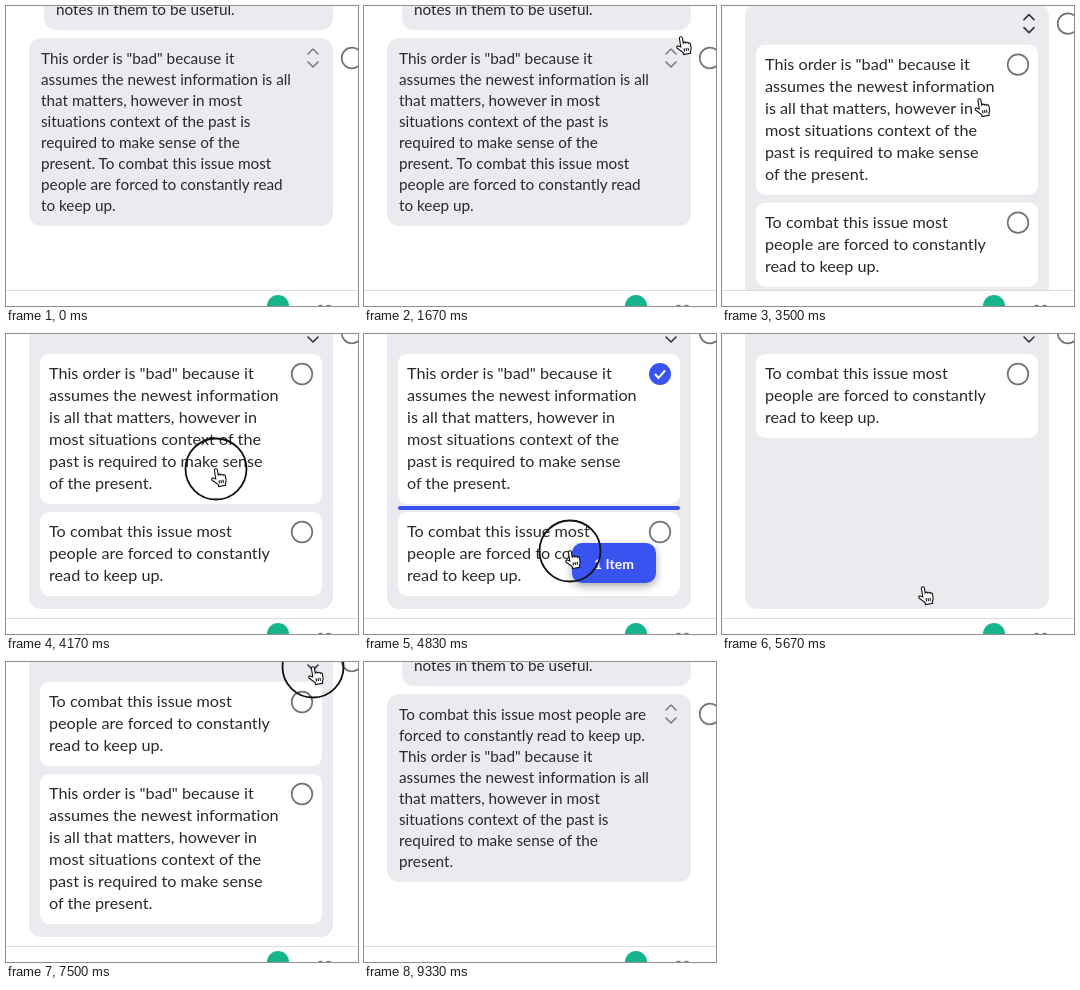
Write an HTML page that moves like this. It is 352x300 px and loops after 9670 ms.

```html
<!DOCTYPE html>
<html lang="en">
<head>
<meta charset="utf-8">
<title>Reordering notes</title>
<style>
html, body { margin: 0; width: 100%; height: 100%; overflow: hidden; background: #fff; }
svg { display: block; width: 352px; height: 300px; font: 15.3px Lato, sans-serif; font-variant-ligatures: none; fill: #29292d; }
.card text { font-size: 16.2px; }
.block { fill: #eceaee; }
.line { fill: none; stroke: #73717b; stroke-width: 1.7; stroke-linecap: round; stroke-linejoin: round; }
.chevrons { stroke-width: 1.4; }
.open { stroke: #333; stroke-width: 1.6; }
.blue { fill: #3853f0; }
.badge { filter: drop-shadow(0 3px 4px #0005); }
.badge text { font-size: 14px; font-weight: 700; fill: #fff; text-anchor: middle; }
</style>
</head>
<body>
<svg id="stage" viewBox="0 0 352 300"></svg>
<script>
const LOOP = 9670, STEP = 1000 / 6;
const OPEN = 14, CLOSE = 47, LIFT = 33, DROP = 35;

const before = ['This order is "bad" because it', 'assumes the newest information is all',
  'that matters, however in most', 'situations context of the past is', 'required to make sense of the',
  'present. To combat this issue most', 'people are forced to constantly read', 'to keep up.'];
const after = ['To combat this issue most people are', 'forced to constantly read to keep up.',
  ...before.slice(0, 5), 'present.'];
const order = ['This order is "bad" because it', 'assumes the newest information',
  'is all that matters, however in', 'most situations context of the', 'past is required to make sense', 'of the present.'];
const combat = ['To combat this issue most', 'people are forced to constantly', 'read to keep up.'];

// Pointer path: step, x, y
const path = [[2, 251, 211], [3, 251, 211], [5, 225, 130], [8, 290, 4], [10, 312, 30], [11, 302, 48],
  [14, 302, 48], [16, 300, 50], [18, 300, 50], [24, 205, 134], [26, 205, 134], [29, 201, 216],
  [31, 196, 252], [34, 196, 252], [36, 0, 230], [38, 62, 190], [44, 302, 4], [48, 302, 4],
  [52, 262, 75], [53, 49, 200]];

const within = (n, a, b) => n >= a && n <= b;
const ease = k => (k = Math.min(1, Math.max(0, k)), k * k * (3 - 2 * k));
const box = (x, y, w, h, r, attrs) => `<rect x="${x}" y="${y}" width="${w}" height="${h}" rx="${r}" ${attrs}/>`;
const lines = (rows, x, y, pitch) =>
  rows.map((row, i) => `<text x="${x}" y="${y + i * pitch}">${row}</text>`).join('');
const radio = (x, y) => `<circle class="line" cx="${x}" cy="${y}" r="10.3"/>`;
const check = (x, y) => `<circle class="blue" cx="${x}" cy="${y}" r="11"/>
  <path d="M${x - 5} ${y}l3.5 4 6.5-7.5" fill="none" stroke="#fff" stroke-width="2"/>`;

function pointer(n) {
  const i = path.findIndex(p => p[0] >= n);
  if (n < path[0][0] || i < 0) return null;
  const b = path[i], a = path[i - 1] || b;
  const k = b === a ? 1 : (n - a[0]) / (b[0] - a[0]);
  return [a[1] + (b[1] - a[1]) * k, a[2] + (b[2] - a[2]) * k];
}

function cards(n) {
  const list = n < LIFT ? [order, combat] : n < DROP ? [combat] : [combat, order];
  let y = 73;
  return list.map(rows => {
    const top = y, h = rows.length * 22 + 18;
    y += h + 8;
    const mark = rows === order && within(n, 26, LIFT) ? check : radio;
    return `<g class="card">${box(34, top, 282, h, 9, 'fill="#fff"')}
      ${lines(rows, 43, top + 25, 22)}${mark(296, top + 20)}</g>`;
  }).join('');
}

function page(n) {
  const open = n >= OPEN && n < CLOSE;
  const scroll = open ? 53 * ease((n - 18) / 5) : 0;
  const body = open ? cards(n) : lines(n < OPEN ? before : after, 35, 57.5, 21);
  const marker = within(n, 28, 32) ? box(34, n < 30 ? 225 : 318, 282, 4, 2, 'class="blue"') : '';
  return `<g transform="translate(0 ${-scroll})">
    ${box(38, -60, 289, 84, 12, 'class="block"')}
    <text x="50" y="8.5">notes in them to be useful.</text>
    ${box(23, 32, 304, open ? 296 : 188, 12, 'class="block"')}
    <path class="line chevrons ${open ? 'open' : ''}" d="M302 48l5-5 5 5M302 56l5 5 5-5"/>
    ${radio(346, 52)}${body}${marker}</g>`;
}

const footer = box(0, 284, 352, 16, 0, 'fill="#fff"') + box(0, 284, 352, 1, 0, 'fill="#dcdbdf"') +
  '<circle cx="272" cy="300" r="11" fill="#17b58c"/>' +
  '<path class="line" d="M312 300.8q2.5-2.5 5 0m3 0q2.500-2.500 5 0"/>';

function hand(n) {
  const p = pointer(n);
  if (!p) return '';
  const badge = within(n, 27, 32) ? `<g class="badge">${box(7, -7, 84, 40, 10, 'class="blue"')}
    <text x="49" y="18.5">1 Item</text></g>` : '';
  const pressed = within(n, 12, 13) || within(n, 25, 31) || within(n, 45, 46);
  const ring = pressed ? '<circle cx="5" cy="1" r="30.5" fill="none" stroke="#111" stroke-width="1.8"/>' : '';
  return `<g transform="translate(${p})">${badge}
    <path transform="rotate(-9 7 9)" fill="#fff" stroke="#111" stroke-width="1.1"
      d="M4.5 10.5V2a1.5 1.5 0 0 1 3 0V7a1.5 1.5 0 0 1 2.6 .4 1.4 1.4 0 0 1 2.4 .7
      1.3 1.3 0 0 1 2 1.2V13q0 2-1.3 3.5V18.500H6V16.5L.8 11.3a1.3 1.3 0 0 1 1.9-1.8z
      M7.5 12.5v3M9.5 12.5v3M11.5 12.5v3"/>${ring}</g>`;
}

const stage = document.getElementById('stage');
let shown = -1;
function tick() {
  const n = Math.floor((performance.now() % LOOP + 4) / STEP) % 58;
  if (n !== shown) stage.innerHTML = page(n) + footer + hand(n);
  shown = n;
  requestAnimationFrame(tick);
}
tick();
</script>
</body>
</html>
```
